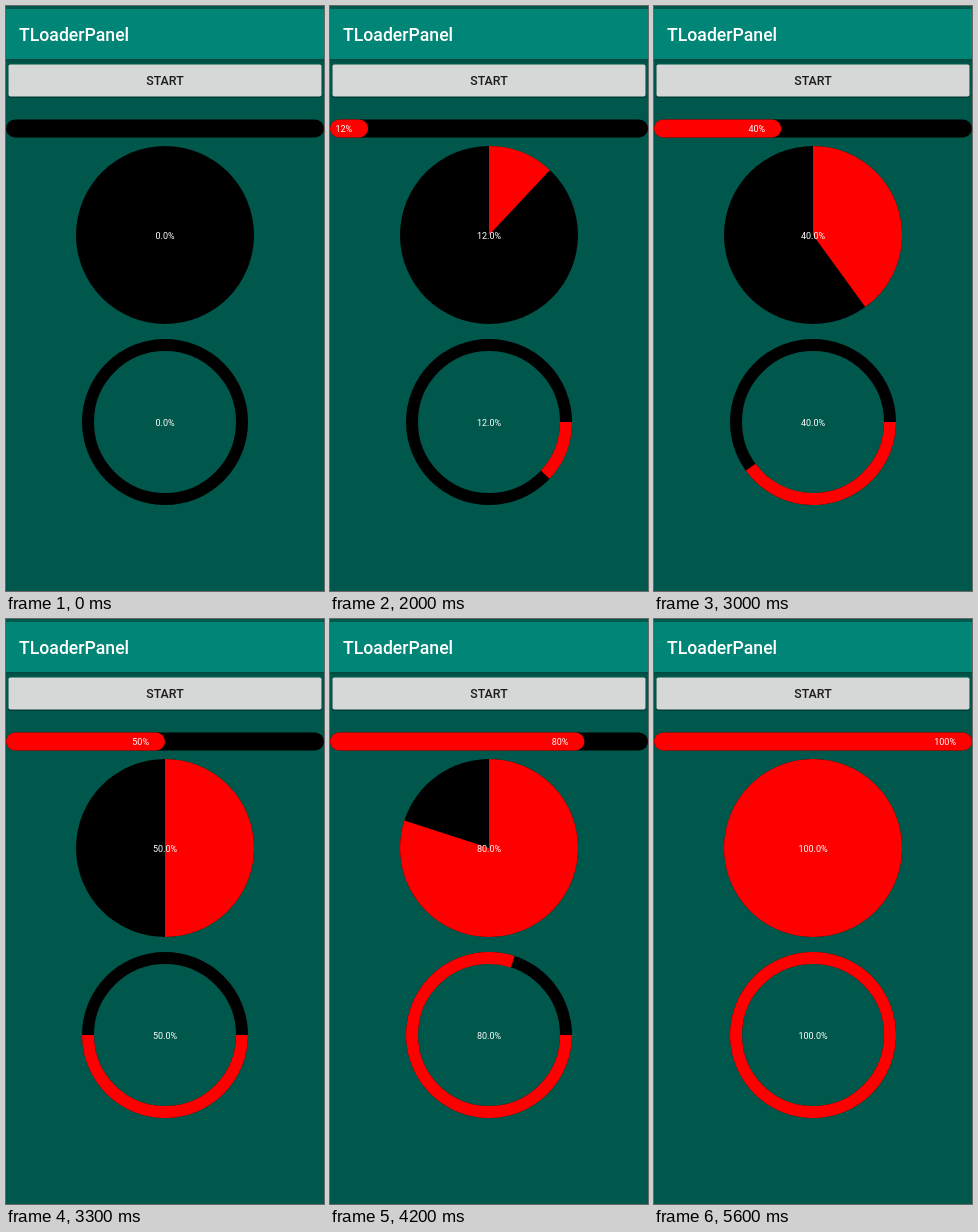
Animation, 318 px wide and 585 px high, one loop 6900 ms. Source, as an HTML page:

```html
<!DOCTYPE html>
<html lang="en">
<head>
<meta charset="utf-8">
<title>Progress demo</title>
<style>
  html, body { margin: 0; width: 100%; height: 100%; overflow: hidden; background: #00574b; }
  svg { display: block; font-family: Roboto, "Open Sans", sans-serif; }
  .value { font-size: 9px; fill: #fff; }
  .mid { text-anchor: middle; }
  .end { text-anchor: end; }
  .arc { fill: none; stroke: #f00; }
</style>
</head>
<body>
<svg width="318" height="585" viewBox="0 0 318 585">
  <defs>
    <linearGradient id="shade" x2="0" y2="1">
      <stop offset="0" stop-opacity=".16"/>
      <stop offset="1" stop-opacity="0"/>
    </linearGradient>
    <clipPath id="face"><rect x="2.5" y="58.5" width="313" height="32" rx="1.8"/></clipPath>
  </defs>
  <rect width="318" height="585" fill="#00574b"/>
  <rect y="3" width="318" height="50" fill="#008577"/>
  <rect y="53" width="318" height="4" fill="url(#shade)"/>
  <text x="13" y="35" font-size="17.67" font-weight="500" fill="#fff">TLoaderPanel</text>

  <rect x="2" y="59" width="314" height="33" rx="2" fill-opacity=".28"/>
  <g clip-path="url(#face)">
    <rect x="2" y="58" width="314" height="33" fill="#d6d7d7"/>
    <g id="press" opacity="0">
      <rect x="2" y="58" width="314" height="33" fill-opacity=".045"/>
      <circle id="ripple" cy="74.5" fill-opacity=".035"/>
    </g>
  </g>
  <text class="mid" x="159" y="79" font-size="12.36" font-weight="500" fill="#1c1c1c">START</text>

  <rect y="113.5" width="318" height="18" rx="9"/>
  <rect id="bar" y="113.5" height="18" rx="9" ry="9" fill="#f00"/>
  <text id="barText" class="value end" y="125.5"></text>

  <circle cx="159" cy="229" r="89"/>
  <circle id="pie" class="arc" cx="159" cy="229" r="44.5" stroke-width="89"
    pathLength="100" transform="rotate(-90 159 229)"/>
  <text id="pieText" class="value mid" x="159" y="233"></text>

  <circle cx="159" cy="416" r="77" fill="none" stroke="#000" stroke-width="12"/>
  <circle id="ring" class="arc" cx="159" cy="416" r="77" stroke-width="12" pathLength="100"/>
  <text id="ringText" class="value mid" x="159" y="419.5"></text>
</svg>
<script>
const LOOP = 6900, STEP = 100, WIDTH = 318;
const $ = id => document.getElementById(id);

// [ms, phase] pairs; the phase is then eased in and out
const PHASES = [
  [1100, 0], [1800, .16], [2000, .2255], [2600, .3565], [3300, .502], [4200, .708],
  [4600, .797], [4700, .797], [4800, .83], [5300, .94], [5600, 1]
];

const clamp = x => Math.min(1, Math.max(0, x));
const ramp = (t, from, to) => clamp((t - from) / (to - from));

function phaseAt(t) {
  const i = PHASES.findIndex(([ms]) => ms > t);
  if (i === 0) return 0;
  if (i < 0) return 1;
  const [t0, p0] = PHASES[i - 1], [t1, p1] = PHASES[i];
  return p0 + (p1 - p0) * ramp(t, t0, t1);
}

const percentAt = t => Math.floor((1 - Math.cos(Math.PI * phaseAt(t))) * 50 + 1e-6);

function drawPress(t) {
  const grow = ramp(t, 1200, 1500);
  $("ripple").setAttribute("cx", 184 - 25 * grow);
  $("ripple").setAttribute("r", 64 + 101 * grow);
  $("press").setAttribute("opacity", t < 1200 ? 0 : 1 - ramp(t, 1300, 1700));
}

function drawProgress(n) {
  const edge = WIDTH * n / 100;
  $("bar").setAttribute("width", edge);
  $("barText").setAttribute("x", edge - 16);
  $("barText").textContent = n ? n + "%" : "";
  for (const id of ["pie", "ring"]) {
    $(id).setAttribute("stroke-dasharray", n + " 100");
    $(id).setAttribute("visibility", n ? "visible" : "hidden");
    $(id + "Text").textContent = n.toFixed(1) + "%";
  }
}

const start = performance.now();
function frame() {
  const elapsed = (performance.now() - start) % LOOP;
  const t = Math.floor(elapsed / STEP) * STEP;
  drawPress(t);
  drawProgress(percentAt(t));
  requestAnimationFrame(frame);
}
frame();
</script>
</body>
</html>
```
